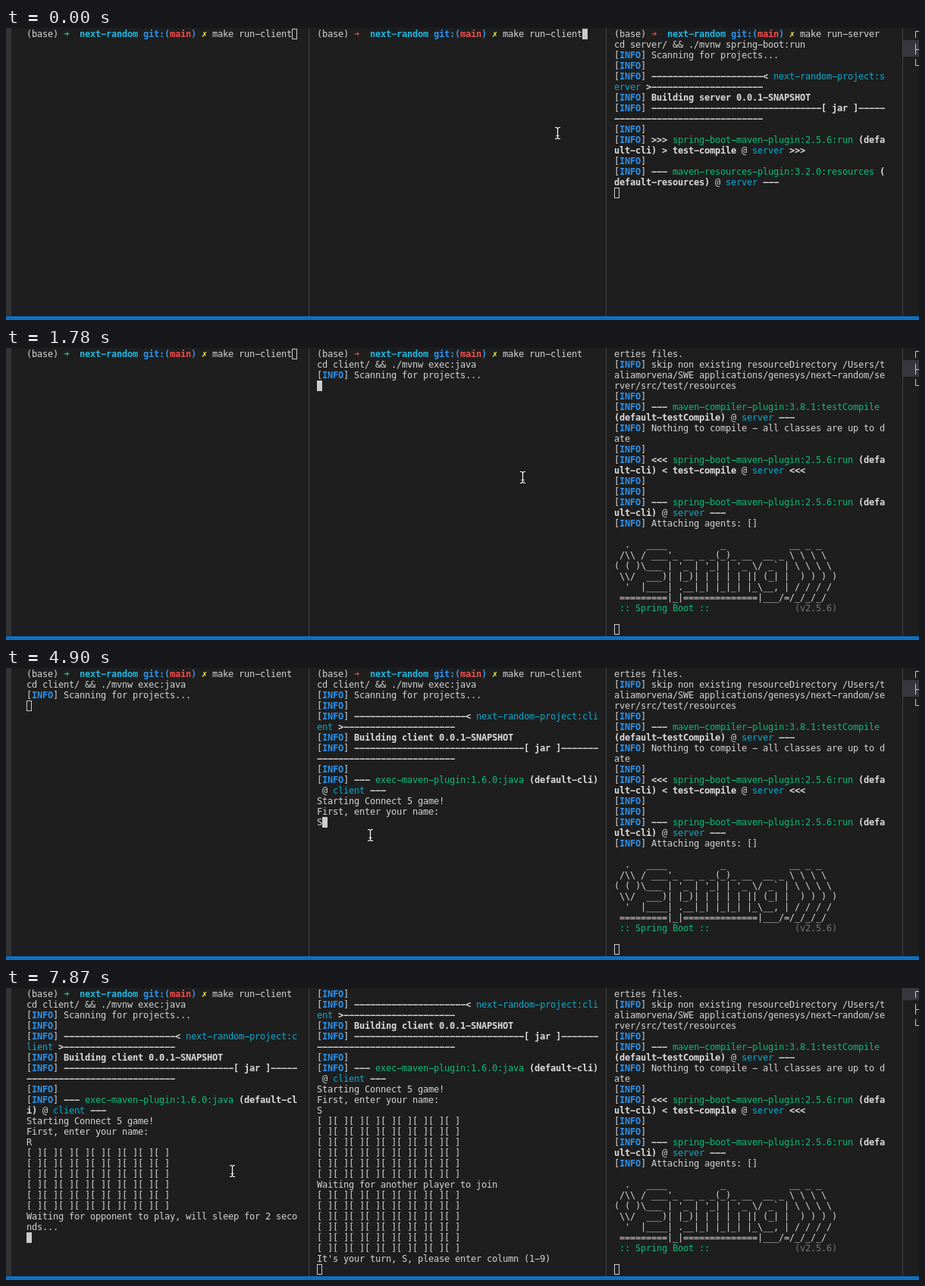
Recreate the animation shown at these times as an HTML page with a canvas. Size 1204 by 386 pixels, loop 8 s.

```html
<!DOCTYPE html>
<html lang="en">
<head>
<meta charset="utf-8">
<title>Terminal panes</title>
<style>
html, body { margin: 0; width: 1204px; height: 386px; overflow: hidden; background: #1e1e1e; }
canvas { display: block; }
</style>
</head>
<body>
<canvas id="stage" width="1204" height="386"></canvas>
<script>
const ctx = document.getElementById('stage').getContext('2d');
const LOOP = 8000, CELL_W = 7, CELL_H = 14, ROWS = 27;
const FAMILY = '12px "DejaVu Sans Mono", "Liberation Mono", monospace';

// "§x" in a line switches to style x: [colour, bold]
const STYLES = {
  0: ['#d4d4d4'], w: ['#dcdcdc', 1], i: ['#2b92ee', 1], c: ['#11a8cd'],
  C: ['#1fb6e0', 1], g: ['#0dbc79'], G: ['#23d18b', 1], r: ['#f14c4c', 1],
  y: ['#f5f543', 1], d: ['#767676'],
};

const info = (s = '') => `[§iINFO§0] ${s}`;
const prompt = (arrow, target) =>
  `(base) §${arrow}➜  §Cnext-random §igit:(§rmain§i) §y✗§0 make ${target}`;
const goal = (mark, plugin, run, module) =>
  info(`§w${mark} §g${plugin} §w(${run})§0 @ §c${module} §w${mark}`);
const dashes = n => '-'.repeat(n);
const header = module => [
  info('Scanning for projects...'),
  info(),
  info(`§w${dashes(21)}< §cnext-random-project:${module} §w>${dashes(21)}`),
  info(`§wBuilding ${module} 0.0.1-SNAPSHOT`),
  info(`§w${dashes(32)}[ jar ]${dashes(33)}`),
  info(),
];
const board = Array(6).fill('[ ]'.repeat(9));
const client = (arrow, name) => [
  prompt(arrow, 'run-client'),
  'cd client/ && ./mvnw exec:java',
  ...header('client'),
  goal('---', 'exec-maven-plugin:1.6.0:java', 'default-cli', 'client'),
  'Starting Connect 5 game!',
  'First, enter your name:',
  name,
  ...board,
];
const copying = ['resources.', 'properties files.']
  .map(what => info(`Using 'UTF-8' encoding to copy filtered ${what}`));
const upToDate = info('Nothing to compile - all classes are up to date');
const boot = 'spring-boot-maven-plugin:2.5.6:run';
const banner = String.raw`
  .   ____          _            __ _ _
 /\\ / ___'_ __ _ _(_)_ __  __ _ \ \ \ \
( ( )\___ | '_ | '_| | '_ \/ _${'`'} | \ \ \ \
 \\/  ___)| |_)| | | | | || (_| |  ) ) ) )
  '  |____| .__|_| |_|_| |_\__, | / / / /
 =========|_|==============|___/=/_/_/_/`.split('\n');

const server = [
  prompt('r', 'run-server'),
  'cd server/ && ./mvnw spring-boot:run',
  ...header('server'),
  goal('>>>', boot, 'default-cli) > test-compile', 'server').replace('compile)', 'compile'),
  info(),
  goal('---', 'maven-resources-plugin:3.2.0:resources', 'default-resources', 'server'),
  ...copying,
  info('Copying 1 resource'),
  info('Copying 0 resources'),
  info(),
  goal('---', 'maven-compiler-plugin:3.8.1:compile', 'default-compile', 'server'),
  upToDate,
  info(),
  goal('---', 'maven-resources-plugin:3.2.0:testResources', 'default-testResources', 'server'),
  ...copying,
  info('skip non existing resourceDirectory /Users/taliamorvena/SWE applications/genesys/next-random/server/src/test/resources'),
  info(),
  goal('---', 'maven-compiler-plugin:3.8.1:testCompile', 'default-testCompile', 'server'),
  upToDate,
  info(),
  goal('<<<', boot, 'default-cli) < test-compile', 'server').replace('compile)', 'compile'),
  info(),
  info(),
  goal('---', boot, 'default-cli', 'server'),
  info('Attaching agents: []'),
  ...banner,
  ` §g:: Spring Boot ::${' '.repeat(16)}§d(v2.5.6)`,
  '',
];

// Turns marked-up lines into rows of [character, style], wrapped at cols
function wrap(lines, cols) {
  const rows = [];
  for (const line of lines) {
    const cells = [];
    let style = 0;
    for (let i = 0; i < line.length; i++) {
      if (line[i] === '§') style = line[++i];
      else cells.push([line[i], style]);
    }
    do rows.push(cells.splice(0, cols)); while (cells.length);
  }
  return rows;
}

// steps: [time, rows printed, cursor stays on the last row]
const panes = [
  {
    x: 27,
    rows: wrap([...client('G', 'R'), 'Waiting for opponent to play, will sleep for 2 seconds...'], 51),
    steps: [[0, 1, 1], [3550, 2], [4900, 3], [5190, 10], [5340, 12], [5640, 14],
      [6970, 15, 1], [7420, 15], [7720, 23]],
  },
  {
    x: 410,
    rows: wrap([...client('r', 'S'), 'Waiting for another player to join', ...board,
      "It's your turn, S, please enter column (1-9)"], 53),
    steps: [[0, 1, 1], [440, 2], [1780, 3], [2080, 10], [2220, 12], [2520, 14],
      [4900, 15, 1], [5190, 15], [5490, 22], [7870, 29]],
  },
  {
    x: 802,
    rows: wrap(server, 51),
    steps: [[0, 15], [150, 24], [440, 39], [740, 49], [1490, 58]],
  },
];
const focus = [[0, 1], [3110, 0], [4300, 1], [6370, 0]];
const mouse = [[0, 727, 139], [1190, 722, 143], [1340, 708, 153], [1640, 688, 167],
  [1780, 681, 171], [2520, 480, 191], [2660, 370, 193], [2810, 303, 194],
  [3850, 345, 205], [4000, 425, 216], [4150, 480, 221], [5040, 479, 226],
  [5640, 474, 240], [5780, 471, 246], [5930, 466, 246], [6080, 420, 244],
  [6220, 330, 242], [6370, 298, 242]];

const at = (steps, t) => steps.findLast(s => s[0] <= t);

function fill(color, x, y, w, h) {
  ctx.fillStyle = color;
  ctx.fillRect(x, y, w, h);
}

function drawPane({ x, rows, steps }, t, focused) {
  const [, count, inline] = at(steps, t);
  const cursorRow = inline ? count - 1 : count;
  const top = Math.max(0, cursorRow - ROWS + 1);
  for (let r = top; r < count; r++) {
    rows[r].forEach(([ch, style], col) => {
      if (ch === ' ') return;
      const [color, bold] = STYLES[style];
      ctx.font = (bold ? 'bold ' : '') + FAMILY;
      ctx.fillStyle = color;
      ctx.fillText(ch === '-' ? '−' : ch, x + col * CELL_W, 12 + (r - top) * CELL_H);
    });
  }
  const cx = x + (inline ? rows[cursorRow].length * CELL_W : 0);
  const cy = 1 + (cursorRow - top) * CELL_H;
  if (focused) return fill('#cccccc', cx, cy, CELL_W, CELL_H);
  ctx.strokeStyle = '#cccccc';
  ctx.strokeRect(cx + .5, cy + .5, CELL_W - 1, CELL_H - 1);
}

function drawTabs(active) {
  fill('#37373d', 1183, active * 22 - 6, 21, 22);
  ctx.strokeStyle = '#cccccc';
  ctx.stroke(new Path2D('M1204 4.5H1199.5V13M1199.5 21V35M1199.5 28.5H1204M1199.5 41V49.5H1204'));
}

function drawMouse(x, y) {
  const beam = new Path2D(
    `M${x - 3} ${y - 7.5}h2l1.5 1.5l1.5 -1.5h2M${x + .5} ${y - 6}v12` +
    `M${x - 3} ${y + 7.5}h2l1.5 -1.5l1.5 1.5h2M${x - 1.5} ${y + 3.5}h4`);
  for (const [color, width] of [['#1e1e1e', 3], ['#ffffff', 1.2]]) {
    ctx.strokeStyle = color;
    ctx.lineWidth = width;
    ctx.stroke(beam);
  }
  ctx.lineWidth = 1;
}

function draw(now) {
  const t = now % LOOP, active = at(focus, t)[1];
  fill('#1e1e1e', 0, 0, 1204, 386);
  fill('#333333', 0, 0, 7, 381);
  for (const x of [399, 791, 1182]) fill('#414141', x, 0, 1, 381);
  drawTabs(active);
  panes.forEach((pane, i) => drawPane(pane, t, i === active));
  fill('#0e70c0', 0, 381, 1204, 5);
  drawMouse(...at(mouse, t).slice(1));
}

let start;
function tick(now) {
  start ??= now;
  draw(now - start);
  requestAnimationFrame(tick);
}
requestAnimationFrame(tick);
</script>
</body>
</html>
```
